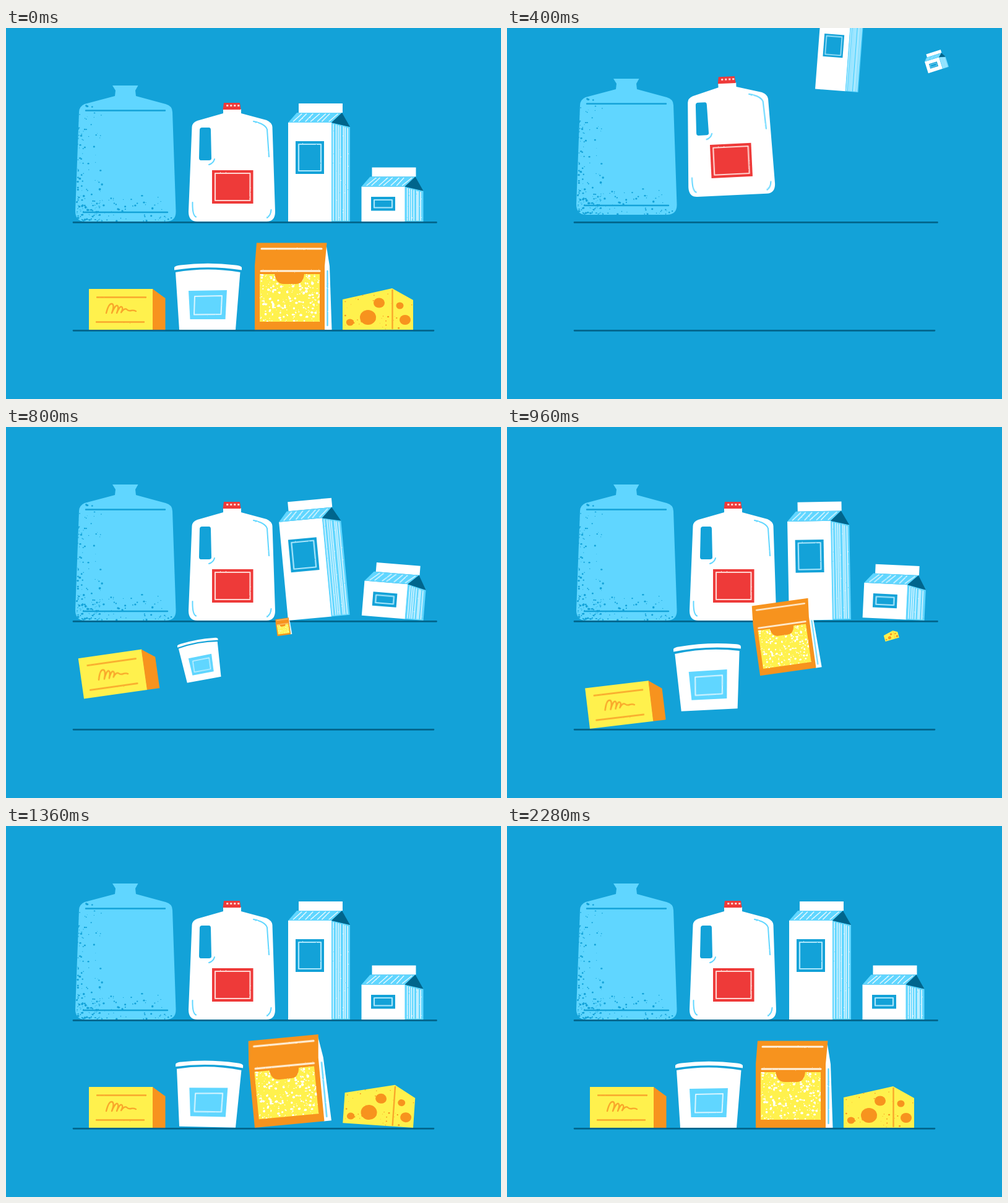
Animation, 800 px wide and 600 px high, one loop 2.32 s. Source, as an HTML page:

```html
<!DOCTYPE html>
<html lang="en">
<head>
<meta charset="utf-8">
<title>Dairy shelves</title>
<style>
  html, body { margin: 0; width: 100%; height: 100%; overflow: hidden; background: #13a2d8; }
  svg { display: block; width: 100%; height: 100%; }
  .sky { fill: #13a2d8; } .pale { fill: #60d6ff; } .white { fill: #fff; } .deep { fill: #00658c; }
  .red { fill: #ee3a39; } .yellow { fill: #fff14d; } .orange { fill: #f7931e; }
  .line { fill: none; stroke-linecap: round; stroke-linejoin: round; }
</style>
</head>
<body>
<svg viewBox="0 0 800 600" stroke-width="2.4">
  <defs>
    <filter id="chalk" x="-10%" y="-10%" width="120%" height="120%">
      <feTurbulence type="fractalNoise" baseFrequency=".6" numOctaves="1" seed="4"/>
      <feDisplacementMap in="SourceGraphic" scale="2" xChannelSelector="R" yChannelSelector="G"/>
    </filter>
    <path id="drumShape" d="M172 93H213.5L209 101 210 110 258 123Q269 126 269 136L274.5 296Q275 313 258 313H128Q112 313 112 296L118 136Q118 127 127 123L176 110 177 101Z"/>
    <path id="cheeseShape" d="M544 439L624 421 658 440V488H544Z"/>
    <clipPath id="drumClip"><use href="#drumShape"/></clipPath>
    <clipPath id="cheeseClip"><use href="#cheeseShape"/></clipPath>
    <clipPath id="windowClip"><path d="M410 398H507V475H410Z"/></clipPath>
  </defs>

  <path class="line" stroke="#00658c" stroke-width="2.8" d="M109 314.4H695.5M109 489.3H691"/>

  <g id="drum">
    <use href="#drumShape" class="pale"/>
    <g id="drumSpecks" class="sky" clip-path="url(#drumClip)"></g>
    <path class="line" stroke="#13a2d8" d="M129 133.5H257M125 298H261"/>
  </g>

  <g id="jug">
    <path class="white" d="M351 131H380V138L421 149Q430 153 430.5 160L435 297Q435 313 421 313H309Q295 313 295 297L300.5 160Q301 153 309 150L351 138Z"/>
    <path class="red" d="M352 121H378L379.5 132H350.5Z"/>
    <path class="line" filter="url(#chalk)" stroke="#ffd3cf" stroke-width="2" stroke-dasharray="1.5 4.5" d="M357 125H377M357 126H377"/>
    <path class="sky" d="M317 161H328Q331 161 331 165L332 211Q332 214 328 214H315Q312 214 312 210L313 165Q313 161 317 161Z"/>
    <path class="line" filter="url(#chalk)" stroke="#60d6ff" stroke-width="2" d="M328 221Q335 219 337 212M400 151Q419 155 422 164L425 208M301.5 282Q301 303 307 305.5M428.5 294Q428 303 422 307"/>
  </g>

  <g id="carton"></g>
  <g id="halfPint"></g>

  <g id="butter">
    <path class="yellow" d="M134 422H237.5V488H134Z"/>
    <path class="orange" d="M237 422L257.5 437V488H237Z"/>
    <path class="line" filter="url(#chalk)" stroke="#f9a72b" d="M147 435.5H226M146 475.5H223M162 461Q166 445 171 446T171 461Q177 447 180 449T179 461Q184 449 187 451T186 460Q192 452 195 455T202 457T210 458"/>
  </g>

  <g id="cup">
    <path class="white" d="M272 391V387Q274 384 282 383.5 326 378 371 383.5 379 384 381 387V391.5Q326 383 272 391.5ZM274 395Q326 386 378.5 395L371 488H280Z"/>
    <path class="pale" d="M295 425L357 424 354.5 471H297.5Z"/>
    <path class="line" filter="url(#chalk)" stroke="#d9f5ff" stroke-width="2" d="M305 434L349 433 347.5 463 304 463.5Z"/>
  </g>

  <g id="bag">
    <path class="white" d="M517 347.5L523 385 526.5 488H514V385Z"/>
    <path class="orange" d="M405 347.5H518.5L515 385V488H402V385Z"/>
    <path class="yellow" d="M410 398H507V475H410Z"/>
    <g id="bagSpecks" class="white" clip-path="url(#windowClip)"></g>
    <path class="orange" d="M434 397Q436 414 449 414H468Q481 414 482 397Z"/>
    <g class="line" filter="url(#chalk)">
      <path stroke="#fff3e0" stroke-width="3" d="M413 357H510M412 393H507"/>
      <path stroke="#60d6ff" d="M519.5 393V481"/>
    </g>
  </g>

  <g id="cheese">
    <use href="#cheeseShape" class="yellow"/>
    <g class="orange" clip-path="url(#cheeseClip)">
      <g id="cheeseSpecks"></g>
      <ellipse cx="556" cy="476" rx="6.2" ry="5.5"/>
      <ellipse cx="585" cy="468" rx="13" ry="12"/>
      <ellipse cx="603" cy="444.5" rx="9" ry="8"/>
      <ellipse cx="636.5" cy="449" rx="6" ry="5.5"/>
      <ellipse cx="645" cy="472" rx="9" ry="8"/>
    </g>
    <path class="line" stroke="#f9a72b" d="M624.5 424V486"/>
  </g>
</svg>

<script>
const byId = id => document.getElementById(id);
const add = (id, markup) => byId(id).insertAdjacentHTML('beforeend', markup);
const repeat = (count, make) => Array.from({ length: count }, (_, i) => make(i)).join('');

let seed = 11;
const rand = () => (seed = seed * 16807 % 2147483647) / 2147483647;
const between = (a, b) => a + (b - a) * rand();

function speckle(id, count, place, minR, maxR) {
  add(id, repeat(count, () => {
    const [x, y] = place(), r = minR + (maxR - minR) * rand() ** 2;
    return `<ellipse cx="${x}" cy="${y}" rx="${r}" ry="${r * between(.7, 1.1)}"/>`;
  }));
}

// Filled panel with a chalk frame inside it
const label = (x, y, w, h, fill, ink) => `
  <rect class="${fill}" x="${x}" y="${y}" width="${w}" height="${h}"/>
  <rect class="line" filter="url(#chalk)" stroke="${ink}" stroke-width="2.2"
    x="${x + 5}" y="${y + 5}" width="${w - 10}" height="${h - 10}"/>`;

// Gable-top carton whose front face starts at (x, top)
function carton(id, x, top, panel) {
  const h = 313 - top;
  const stripes = repeat(7, i => `M${74 + i * 3.7 + between(-1, 1)} ${3 + i}V${h - 2}`);
  const hatching = repeat(7, i => `M${between(7, 10) + i * 9.5} -2l${between(11, 16)} -12`);
  add(id, `<g transform="translate(${x} ${top})">
    <path class="white" d="M17 -31H88V-16H17ZM0 0H70.5V${h}H0Z"/>
    <path class="pale" d="M14 -16H87L70 0H0ZM70 0L100 7V${h}H70Z"/>
    <path class="line" filter="url(#chalk)" stroke="#e6f8ff" stroke-width="1.5" d="${stripes}${hatching}"/>
    <path class="deep" d="M87 -16L100 7 70 0Z"/>
    ${label(...panel, 'sky', '#a9e5fb')}</g>`);
}

add('jug', label(333, 230, 66.5, 54, 'red', '#ffd3cf'));
carton('carton', 456, 153, [12, 30, 46, 53]);
carton('halfPint', 574.5, 256.5, [15.5, 16.5, 39, 22.5]);

const drumSide = () => [116 + 40 * rand() ** 2.2, between(124, 311)];
const drumBase = () => [between(114, 274), 312 - 42 * rand() ** 1.8];
const drumCorner = () => [114 + 60 * rand() ** 1.5, 311 - 36 * rand() ** 1.3];
speckle('drumSpecks', 95, drumSide, .5, 1.9);
speckle('drumSpecks', 75, drumBase, .5, 1.9);
speckle('drumSpecks', 60, drumCorner, .5, 2);
speckle('bagSpecks', 270, () => [between(410, 507), between(398, 475)], .6, 2.3);
speckle('cheeseSpecks', 48, () => [between(546, 656), between(428, 487)], .4, 1.6);

const LOOP = 2320, STEP = 40, GROW = 260, FALL = 400, BOUNCE = 280, SETTLE = 370;

// start: ms; from: offset at the start; spin: angle at the start; lean: angle on landing
const items = [
  { id: 'drum', start: -130, from: [-27, -202], spin: -5, lean: 0 },
  { id: 'jug', start: 32, from: [-71, -218], spin: -14, lean: 0 },
  { id: 'carton', start: 219, from: [80, -203], spin: 6, lean: -7 },
  { id: 'halfPint', start: 310, from: [83, -216], spin: -18, lean: 5 },
  { id: 'butter', start: 503, from: [-34, -92], spin: -9, lean: -7 },
  { id: 'cup', start: 641, from: [-27, -59], spin: -12, lean: 4.7 },
  { id: 'bag', start: 750, from: [-6, -87], spin: -8, lean: -8 },
  { id: 'cheese', start: 907, from: [20, -114], spin: -16, lean: 4 }
];

for (const item of items) {
  item.node = byId(item.id);
  const box = item.node.getBBox();
  item.center = [box.x + box.width / 2, box.y + box.height / 2];
  item.corner = [item.lean > 0 ? box.x + box.width : box.x, box.y + box.height];
}

const clamp = v => Math.min(1, Math.max(0, v));

// Grow and spin while falling, then bounce upright or rock back from one corner.
function transformAt({ start, from, spin, lean, center: [cx, cy], corner: [px, py] }, t) {
  const age = t - start;
  const flight = clamp(age / FALL), height = 1 - flight ** 2.6;
  const hop = lean ? 0 : clamp((age - FALL) / BOUNCE);
  const tilt = lean * (1 - clamp((age - FALL) / SETTLE) ** 2);
  const dx = from[0] * (1 - flight);
  const dy = from[1] * height - 44 * hop * (1 - hop);
  return `translate(${dx} ${dy}) rotate(${tilt} ${px} ${py}) translate(${cx} ${cy})
    rotate(${(spin - lean) * height}) scale(${clamp(age / GROW)}) translate(${-cx} ${-cy})`;
}

function draw(now) {
  const t = Math.floor(now % LOOP / STEP) * STEP;
  for (const item of items) {
    const resting = t < STEP, visible = resting || t > item.start;
    item.node.style.display = visible ? '' : 'none';
    if (visible) item.node.setAttribute('transform', transformAt(item, resting ? LOOP : t));
  }
}

const begin = performance.now();
function tick() {
  draw(performance.now() - begin);
  requestAnimationFrame(tick);
}
tick();
</script>
</body>
</html>
```
